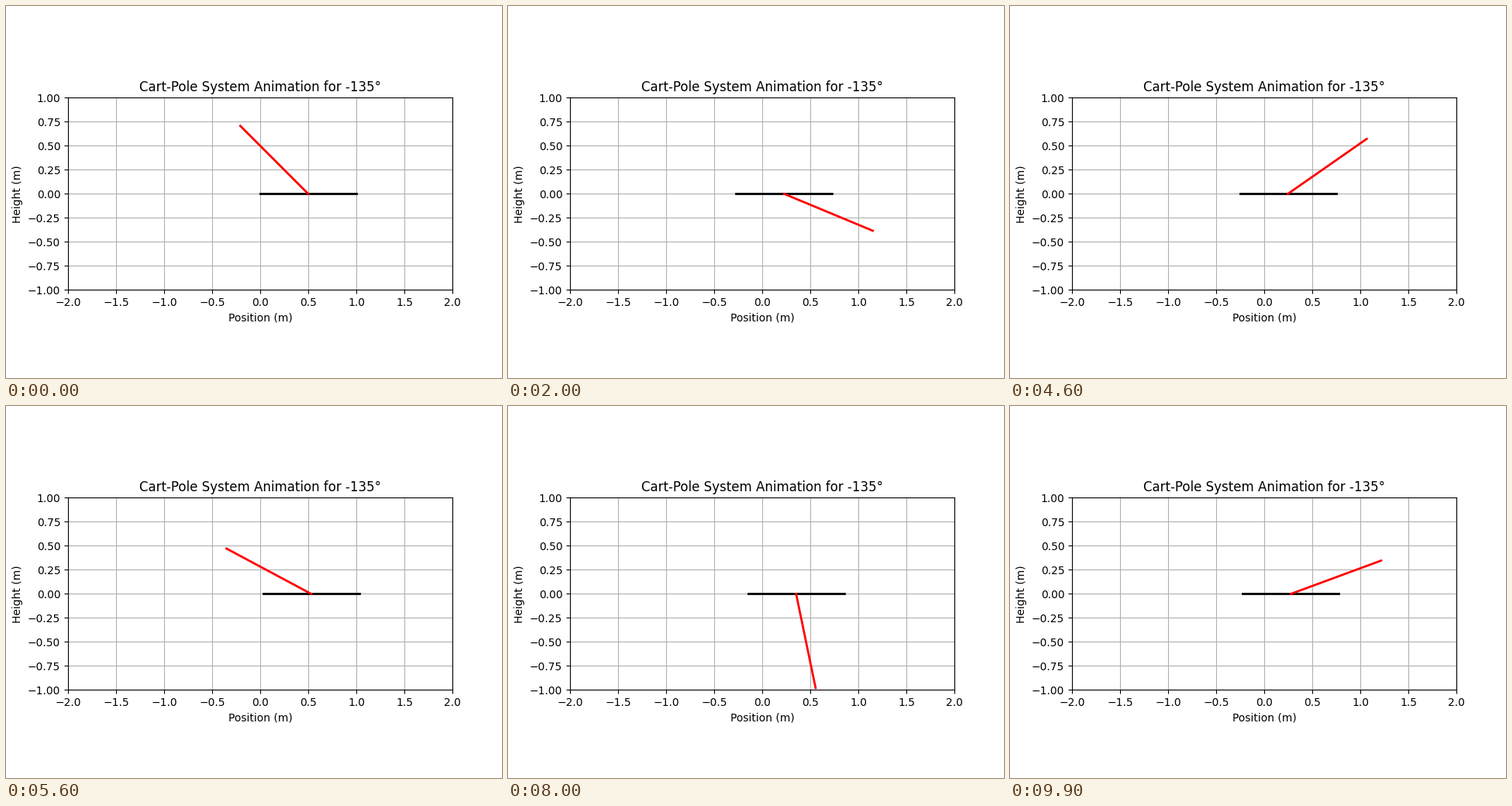
A matplotlib script that plays this animation: 640x480 px, repeating every 10 s.

```python
import numpy as np
import matplotlib.pyplot as plt
from matplotlib.animation import FuncAnimation

CART_MASS, POLE_MASS = 1.0, 0.2
LENGTH, GRAVITY = 1.0, 9.81
CART_WIDTH = 1.0
START_DEG = -135
DURATION, FRAMES = 10.0, 100
RTOL, ATOL = 1e-3, 1e-6

# Dormand-Prince 5(4) coefficients
A = [
    [1/5],
    [3/40, 9/40],
    [44/45, -56/15, 32/9],
    [19372/6561, -25360/2187, 64448/6561, -212/729],
    [9017/3168, -355/33, 46732/5247, 49/176, -5103/18656],
    [35/384, 0, 500/1113, 125/192, -2187/6784, 11/84],
]
E = np.array([-71/57600, 0, 71/16695, -71/1920, 17253/339200, -22/525, 1/40])
D = np.array([-12715105075/11282082432, 0, 87487479700/32700410799,
              -10690763975/1880347072, 701980252875/199316789632,
              -1453857185/822651844, 69997945/29380423])


def cart_pole(state):
    """Free cart with a point-mass pole; the angle is zero hanging down."""
    _, v, theta, omega = state
    s, c = np.sin(theta), np.cos(theta)
    d = CART_MASS + POLE_MASS * s**2
    acc = POLE_MASS * s * (LENGTH * omega**2 + GRAVITY * c) / d
    alpha = -(POLE_MASS * LENGTH * omega**2 * c * s
              + (CART_MASS + POLE_MASS) * GRAVITY * s) / (LENGTH * d)
    return np.array([v, acc, omega, alpha])


def rms(values):
    return np.sqrt(np.mean(values**2))


def first_step(f, y, fy):
    scale = ATOL + np.abs(y) * RTOL
    d0, d1 = rms(y / scale), rms(fy / scale)
    h0 = 0.01 * d0 / d1
    d2 = rms((f(y + h0 * fy) - fy) / scale) / h0
    return min(100 * h0, (0.01 / max(d1, d2)) ** 0.2)


def rk_step(f, y, fy, h):
    k = [fy]
    for row in A:
        y_new = y + h * (np.array(row) @ np.array(k))
        k.append(f(y_new))
    return y_new, np.array(k)


def interpolate(u, y, y_new, k, h):
    """Cubic Hermite curve with a quartic correction, for u in 0..1."""
    u = u[:, None]
    dy = y_new - y
    bend = h * k[0] - dy
    rest = dy - h * k[-1] - bend
    return y + u * (dy + (1 - u) * (bend + u * (rest + (1 - u) * h * (D @ k))))


def solve(f, y, times):
    """Adaptive Runge-Kutta solution sampled at the given times."""
    t, end, fy = times[0], times[-1], f(y)
    h = first_step(f, y, fy)
    out = [y[None, :]]
    while t < end:
        rejected = False
        while True:
            t_new = min(t + h, end)
            h = t_new - t
            y_new, k = rk_step(f, y, fy, h)
            scale = ATOL + np.maximum(np.abs(y), np.abs(y_new)) * RTOL
            err = max(rms(h * (E @ k) / scale), 1e-12)
            factor = 0.9 * err ** -0.2
            if err < 1:
                break
            h *= max(0.2, factor)
            rejected = True
        inside = times[(times > t) & (times <= t_new)]
        out.append(interpolate((inside - t) / h, y, y_new, k, h))
        t, y, fy = t_new, y_new, k[-1]
        h *= min(1 if rejected else 10, factor)
    return np.vstack(out)


times = np.linspace(0, DURATION, FRAMES)
states = solve(cart_pole, np.array([0.5, 0, np.radians(START_DEG), 0]), times)

fig, ax = plt.subplots(figsize=(6.4, 4.8), dpi=100)
ax.set_xlim(-2, 2)
ax.set_ylim(-1, 1)
ax.set_aspect("equal")
ax.grid(True)
ax.set_xlabel("Position (m)")
ax.set_ylabel("Height (m)")
ax.set_title(f"Cart-Pole System Animation for {START_DEG}°")
cart, = ax.plot([], [], "k-", lw=2)
pole, = ax.plot([], [], "r-", lw=2)


def update(i):
    x, _, theta, _ = states[i]
    cart.set_data([x - CART_WIDTH / 2, x + CART_WIDTH / 2], [0, 0])
    pole.set_data([x, x + LENGTH * np.sin(theta)], [0, -LENGTH * np.cos(theta)])
    return cart, pole


anim = FuncAnimation(fig, update, frames=FRAMES, interval=100, repeat=True)
plt.show()
```
